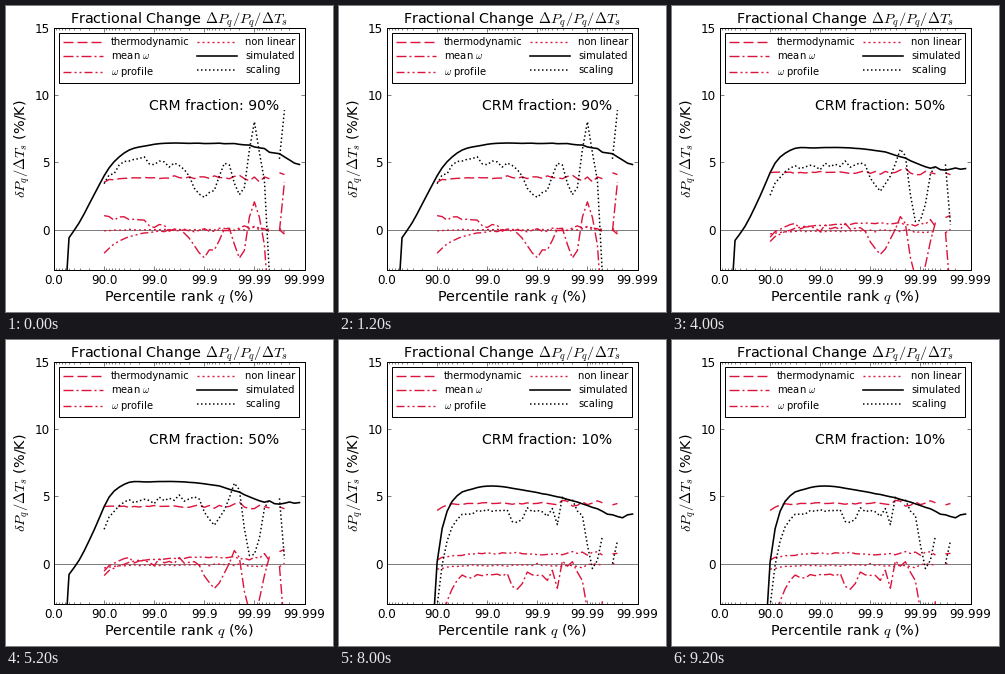
Recreate the animation shown at these times as a matplotlib script. Size 327 by 306 pixels, loop 10 s.

```python
import matplotlib.pyplot as plt
import numpy as np
from matplotlib.animation import FuncAnimation

W, H, DPI = 327, 306, 72
RED = "crimson"
K = np.arange(50)        # ten percentile ranks per decade
X = K / 10
LATE = np.clip((K - 10) / 36, 0, None)
HAS_TERMS = (K >= 10) & (K <= 46) & (K != 44)

plt.rcParams.update({
    "font.family": "DejaVu Sans", "font.size": 12,
    "mathtext.fontset": "cm", "lines.scale_dashes": False,
    "lines.dash_capstyle": "butt", "axes.linewidth": 1,
    "xtick.direction": "in", "ytick.direction": "in",
})


def smooth(ranks, values):
    """Cubic Hermite curve through a few points, off the scale before them."""
    ranks, values = np.array(ranks), np.array(values)
    slope = np.gradient(values, ranks)
    i = np.clip(np.searchsorted(ranks, K, side="right") - 1, 0, len(ranks) - 2)
    h = ranks[i + 1] - ranks[i]
    t = (K - ranks[i]) / h
    curve = ((1 + 2 * t) * (1 - t)**2 * values[i]
             + t * (1 - t)**2 * h * slope[i]
             + t**2 * (3 - 2 * t) * values[i + 1]
             - t**2 * (1 - t) * h * slope[i + 1])
    curve[K < ranks[0]] = values[0] - 6
    curve[K < ranks[0] - 1] = np.nan
    return curve


def settle(level, dip, tau):
    """Starts below its level at the 90th percentile and relaxes to it."""
    return level - dip * np.exp(-(K - 10) / tau)


def bump(center, height, width):
    return height * np.clip(1 - ((K - center) / width)**2, 0, None)


def make_scene(percent, simulated, thermo, profile, rest, scaling,
               bumps, gain):
    rng = np.random.default_rng(percent)

    def jitter(early, late):
        return rng.normal(size=K.size) * (early + late * LATE**3)

    s = {
        "simulated": smooth(*simulated) + jitter(0, .06),
        "thermo": settle(*thermo, 1.5) + jitter(.04, .25),
        "profile": settle(*profile, 4) + jitter(.03, .25),
        "rest": settle(*rest, 3) + jitter(.02, .15),
        "scaling": settle(*scaling) + jitter(.15, .1)
        + sum(bump(*b) for b in bumps),
    }
    # the mean term closes the budget of the scaling
    s["mean"] = s["scaling"] / gain - s["thermo"] - s["profile"] - s["rest"]
    for name, values in s.items():
        if name != "simulated":
            values[~HAS_TERMS] = np.nan
    return percent, s


scenes = [
    make_scene(
        90, ([3, 5, 8, 11, 14, 19, 28, 42, 49],
             [-.6, .5, 2.6, 4.6, 5.7, 6.28, 6.42, 6.0, 4.9]),
        thermo=(3.85, .35), profile=(0, 1.75), rest=(0, .1),
        scaling=(4.7, 1.3, 2), gain=1.25,
        bumps=[(16, .7, 4), (30, -2.3, 3.5), (37, -2.1, 2),
               (40, 3.5, 1.3), (43, -8, 1.1), (46, 4, 1.2)]),
    make_scene(
        75, ([3, 5, 8, 11, 14, 18, 30, 46, 49],
             [-.7, .4, 2.8, 4.95, 5.9, 6.2, 6.0, 4.95, 3.5]),
        thermo=(4.05, .2), profile=(.3, 1.6), rest=(.05, .5),
        scaling=(5, 1.9, 2), gain=1.12,
        bumps=[(27, -1.1, 3), (35, -.6, 2), (38, 1, 1.5),
               (41, -2.7, 2), (46, -11, 1.4)]),
    make_scene(
        50, ([3, 5, 8, 11, 14, 19, 33, 44, 49],
             [-.8, .25, 2.5, 4.95, 5.9, 6.08, 5.75, 4.5, 4.6]),
        thermo=(4.25, 0), profile=(.45, 1.3), rest=(-.1, .2),
        scaling=(4.7, 2.1, 2), gain=1.03,
        bumps=[(32, -1.7, 2.5), (36, 1.3, 1.2), (39.6, -4.3, 2.5),
               (46, -4.6, 1)]),
    make_scene(
        25, ([4, 6, 8, 11, 14, 19, 29, 42, 49],
             [-1.5, 0, 2.2, 4.9, 5.75, 5.9, 5.75, 5.2, 5.7]),
        thermo=(4.45, 0), profile=(.7, 1.1), rest=(-.1, 0),
        scaling=(4.3, 2.2, 3), gain=1,
        bumps=[(31, -.9, 1.2), (34, 1.2, 1.8), (37, -4, 1.3), (38, 3, 1),
               (41.5, -3, 3), (45, -6.8, 1), (46, 1, 1)]),
    make_scene(
        10, ([10, 11, 12, 14, 17, 29, 40, 47, 49],
             [.1, 2.6, 3.9, 5.05, 5.55, 5.35, 4.35, 3.5, 3.7]),
        thermo=(4.5, .5), profile=(.8, .5), rest=(-.1, .3),
        scaling=(3.9, 7, 1.7), gain=.92,
        bumps=[(26, -.8, 2), (34, -1.1, 1), (36, 1.1, 2),
               (41.3, -4.2, 2.1), (45, -3.7, 1), (46, -1.8, 1)]),
]

fig = plt.figure(figsize=(W / DPI, H / DPI), dpi=DPI, facecolor="white")
ax = fig.add_axes([48 / W, 42 / H, 250.5 / W, 242 / H])
ax.set(xlim=(0, 5), ylim=(-3, 15))
ax.set_xticks(range(6), ["0.0", "90.0", "99.0", "99.9", "99.99", "99.999"])
ax.set_xticks([d + 1 - np.log10(m) for d in range(5) for m in range(2, 10)],
              minor=True)
ax.set_yticks([0, 5, 10, 15])
ax.tick_params(which="both", top=True, right=True, width=.5, pad=4)
ax.tick_params(which="major", length=4)
ax.tick_params(which="minor", length=2)
ax.axhline(0, color="gray", lw=1)


def label(x, y, text, size=14.4, **kw):
    """Text on a baseline given in pixels from the top left corner."""
    return fig.text(x / W, 1 - y / H, text, size=size, va="baseline", **kw)


label(172.5, 18, r"Fractional Change $\Delta P_q/P_q/\Delta T_s$", ha="center")
label(173, 295, "Percentile rank $q$ (%)", ha="center")
label(20, 143, r"$\delta P_q/\Delta T_s$ (%/K)", ha="center",
      rotation=90, rotation_mode="anchor")
note = label(143, 104, "", size=14)

STYLES = [
    ("thermo", "thermodynamic", RED, 1.4, (10, 4)),
    ("mean", r"mean $\omega$", RED, 1.4, (10, 3, 2, 3)),
    ("profile", r"$\omega$ profile", RED, 1.4, (8, 3, 2, 3, 2, 3)),
    ("rest", "non linear", RED, 1.4, (2, 3)),
    ("simulated", "simulated", "black", 1.6, None),
    ("scaling", "scaling", "black", 1.5, (1.5, 2.5)),
]
lines = {}
for name, text, color, width, dash in STYLES:
    style = (0, dash) if dash else "-"
    lines[name], = ax.plot([], [], color=color, lw=width, ls=style, label=text)

legend = ax.legend(loc="upper center", ncol=2, fontsize=10, fancybox=False,
                   framealpha=1, edgecolor="black", handlelength=4,
                   handletextpad=.8, columnspacing=.7, borderpad=.4,
                   labelspacing=.42, borderaxespad=.5)
legend.get_frame().set_linewidth(1)


def draw(i):
    percent, scene = scenes[i]
    for name, line in lines.items():
        line.set_data(X, scene[name])
    note.set_text(f"CRM fraction: {percent}%")
    return [*lines.values(), note]


anim = FuncAnimation(fig, draw, frames=len(scenes), interval=2000,
                     repeat=True, repeat_delay=0)
plt.show()
```
